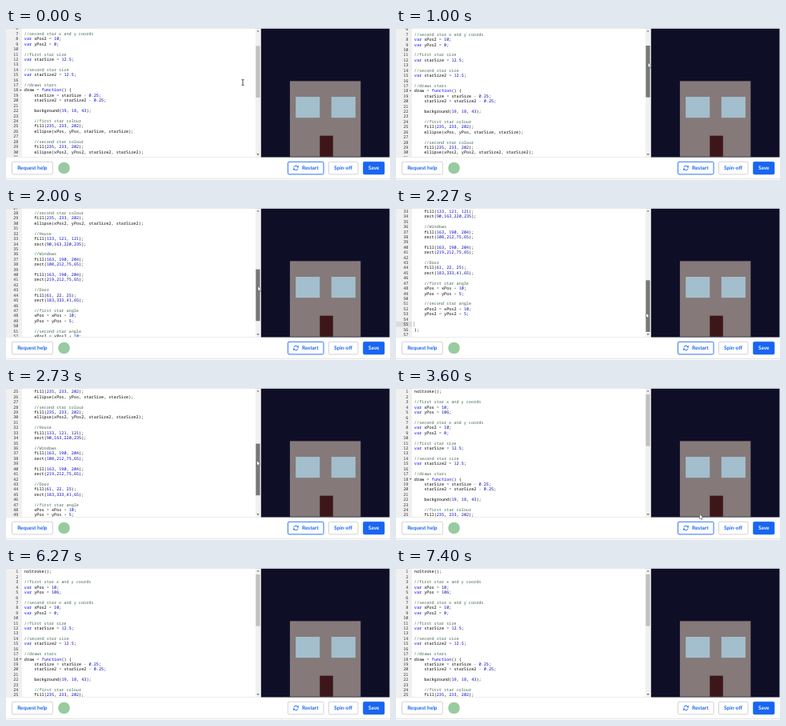
An HTML page with a canvas that plays this animation: 480x190 px, repeating every 7740 ms.

```html
<!DOCTYPE html>
<html lang="en">
<head>
<meta charset="utf-8">
<style>
html, body { margin: 0; width: 100%; height: 100%; overflow: hidden; background: #fff; }
canvas { display: block; width: 480px; height: 190px; }
</style>
</head>
<body>
<canvas id="stage"></canvas>
<script>
const LOOP = 7740;
const LINE = 6.42, CHAR = 3.105, CODE_X = 22.8, FIRST_Y = 4.6;
const SCALE = 0.402, VIEW_X = 318.7, VIEW_Y = 0.8, BOTTOM = 161;
const THUMB_START = 22.4, THUMB_TOP = 8, THUMB_END = 90.3, MAX_SCROLL = 206;
const BLUE = '#1865f2';

const code = `noStroke();

//first star x and y coords
var xPos = 10;
var yPos = 106;

//second star x and y coords
var xPos2 = 10;
var yPos2 = 0;

//first star size
var starSize = 12.5;

//second star size
var starSize2 = 12.5;

//draws stars
draw = function() {
    starSize = starSize - 0.25;
    starSize2 = starSize2 - 0.25;

    background(19, 18, 43);

    //first star colour
    fill(235, 233, 202);
    ellipse(xPos, yPos, starSize, starSize);

    //second star colour
    fill(235, 233, 202);
    ellipse(xPos2, yPos2, starSize2, starSize2);

    //House
    fill(133, 121, 121);
    rect(90,163,220,235);

    //Windows
    fill(163, 190, 204);
    rect(108,212,75,65);

    fill(163, 190, 204);
    rect(219,212,75,65);

    //Door
    fill(61, 22, 25);
    rect(183,333,41,65);

    //first star angle
    xPos = xPos + 10;
    yPos = yPos + 5;

    //second star angle
    xPos2 = xPos2 + 10;
    yPos2 = yPos2 + 5;


};
`.split('\n');

// time, x, y of the pointer
const pointerPath = [
  [0, 296, 68], [400, 296, 68], [850, 315, 43.4], [950, 315, 43.4],
  [1500, 320, 29], [1680, 320, 29], [2200, 312.5, 131], [2470, 312.5, 131],
  [3080, 315, 28], [3200, 315, 28], [3570, 379.5, 157.5], [3660, 379.5, 157.5],
  [3950, 376, 173], [4250, 376, 173], [4850, 328.5, 177.5], [5050, 328.5, 177.5]
];

const canvas = document.getElementById('stage');
const ctx = canvas.getContext('2d');
const dpr = window.devicePixelRatio || 1;
canvas.width = 480 * dpr;
canvas.height = 190 * dpr;

const clamp = (v, lo, hi) => Math.min(hi, Math.max(lo, v));

function pointerAt(t) {
  let i = 1;
  while (i < pointerPath.length - 1 && pointerPath[i][0] < t) i++;
  const [t0, x0, y0] = pointerPath[i - 1];
  const [t1, x1, y1] = pointerPath[i];
  const p = clamp((t - t0) / (t1 - t0), 0, 1);
  const e = p * p * (3 - 2 * p);
  return { x: x0 + (x1 - x0) * e, y: y0 + (y1 - y0) * e };
}

function thumbAt(t, pointer) {
  if (t < 950) return THUMB_START;
  if (t < 3150) return clamp(pointer.y - 21, THUMB_TOP, THUMB_END);
  return THUMB_TOP;
}

function box(x, y, w, h, color) {
  ctx.fillStyle = color;
  ctx.fillRect(x, y, w, h);
}

function polygon(points, fill, stroke, width) {
  ctx.beginPath();
  points.forEach(([x, y]) => ctx.lineTo(x, y));
  ctx.closePath();
  ctx.fillStyle = fill;
  ctx.fill();
  if (stroke) {
    ctx.strokeStyle = stroke;
    ctx.lineWidth = width;
    ctx.stroke();
  }
}

function tokenColor(token) {
  if (token.startsWith('//')) return '#40684c';
  if (/^(var|function)$/.test(token)) return '#0000e6';
  if (/^\d/.test(token)) return '#0000bd';
  if (/^[=+-]$/.test(token)) return '#586676';
  return '#000';
}

function drawCodeLine(line, baseline) {
  for (const match of line.matchAll(/\/\/.*|\w+(?:\.\d+)?|[=+-]|[^\w\s=+-]+/g)) {
    ctx.fillStyle = tokenColor(match[0]);
    ctx.fillText(match[0], CODE_X + match.index * CHAR, baseline);
  }
}

function drawEditor(scroll) {
  ctx.save();
  ctx.beginPath();
  ctx.rect(0, 0, 318, BOTTOM);
  ctx.clip();
  box(0, 0, 20, BOTTOM, '#f0f0f0');
  ctx.font = '5.17px "Noto Sans Mono", "DejaVu Sans Mono", monospace';
  code.forEach((line, i) => {
    const y = FIRST_Y + i * LINE - scroll;
    if (y < -5 || y > BOTTOM + 5) return;
    if (i === 54) {
      box(0, y - LINE / 2, 20, LINE, '#dcdcdc');
      box(22.2, y - LINE / 2, 0.8, LINE, '#aaa');
    }
    ctx.textAlign = 'right';
    ctx.fillStyle = '#333';
    ctx.fillText(i + 1, 15.4, y + 1.8);
    ctx.textAlign = 'left';
    if (i === 17) polygon([[16.9, y - 0.8], [19.5, y - 0.8], [18.2, y + 1]], '#555');
    drawCodeLine(line, y + 1.8);
  });
  ctx.restore();
}

function drawScrollbar(top, dragging) {
  box(311.8, 0, 6.4, BOTTOM, '#f1f1f1');
  box(312.3, top, 5.2, 64.6, dragging ? '#787878' : '#c1c1c1');
  polygon([[313.4, 4.6], [316.6, 4.6], [315, 2.8]], '#777');
  polygon([[313.4, 157.2], [316.6, 157.2], [315, 159]], '#555');
}

function drawScene(t) {
  const frame = Math.floor((t - 4230) / (1000 / 60));
  ctx.save();
  ctx.translate(VIEW_X, VIEW_Y);
  ctx.scale(SCALE, SCALE);
  ctx.beginPath();
  ctx.rect(0, 0, 400, 400);
  ctx.clip();
  box(-1, -1, 402, 402, 'rgb(15,14,39)');
  if (frame >= 0 && frame < 42) {
    const radius = (12.5 - 0.25 * (frame + 1)) / 2;
    ctx.fillStyle = 'rgb(235,233,202)';
    for (const startY of [106, 0]) {
      ctx.beginPath();
      ctx.arc(10 + 10 * frame, startY + 5 * frame, radius, 0, 2 * Math.PI);
      ctx.fill();
    }
  }
  box(90, 163, 220, 235, 'rgb(133,121,121)');
  box(108, 212, 75, 65, 'rgb(163,190,204)');
  box(219, 212, 75, 65, 'rgb(163,190,204)');
  box(183, 333, 41, 65, 'rgb(61,22,25)');
  ctx.restore();
}

function button(label, x, w, textX, style = {}) {
  ctx.beginPath();
  ctx.roundRect(x, 167.3, w, 15.6, 1.6);
  ctx.fillStyle = style.fill || '#fff';
  ctx.fill();
  ctx.strokeStyle = style.border || '#b4b6ba';
  ctx.lineWidth = style.width || 0.6;
  ctx.stroke();
  ctx.fillStyle = style.color || BLUE;
  ctx.fillText(label, textX, 177.3);
}

function drawRestartIcon() {
  const x = 362.4, y = 175;
  ctx.strokeStyle = BLUE;
  ctx.lineWidth = 0.9;
  for (const start of [Math.PI * 1.08, Math.PI * 0.08]) {
    ctx.beginPath();
    ctx.arc(x, y, 2.8, start, start + Math.PI * 0.75);
    ctx.stroke();
  }
  polygon([[x + 3.3, y - 3.3], [x + 3.3, y - 0.5], [x + 0.8, y - 0.8]], BLUE);
  polygon([[x - 3.3, y + 3.3], [x - 3.3, y + 0.5], [x - 0.8, y + 0.8]], BLUE);
}

function drawToolbar(t) {
  box(0, BOTTOM, 480, 29, '#fff');
  box(0, BOTTOM, 480, 0.5, '#d8d8d8');
  box(0, 188, 480, 0.7, '#d6d6d6');
  ctx.font = 'bold 6.44px Lato, sans-serif';
  ctx.textAlign = 'left';
  button('Request help', 7.5, 50.8, 14.2);
  const active = t < 4480;
  button('Restart', 352.4, 44.6, 370, {
    border: active && BLUE,
    width: active && 0.9,
    fill: t >= 4070 && t < 4130 && '#dbe7fd'
  });
  drawRestartIcon();
  button('Spin-off', 403.5, 36.5, 410);
  button('Save', 446.5, 26.5, 453, { fill: BLUE, border: BLUE, color: '#fff' });
  ctx.beginPath();
  ctx.arc(72.5, 175, 7.3, 0, 2 * Math.PI);
  ctx.fillStyle = '#98cba0';
  ctx.fill();
}

function drawPointer(t, { x, y }) {
  if (t >= 5050) return;
  if (x < 311) {
    box(x - 0.4, y - 3.2, 0.8, 6.4, '#222');
    box(x - 1.6, y - 3.6, 3.2, 0.7, '#222');
    box(x - 1.6, y + 2.9, 3.2, 0.7, '#222');
    return;
  }
  const shape = [[0, 0], [0, 6.4], [1.5, 5.1], [2.5, 7.3], [3.5, 6.9], [2.5, 4.7], [4.5, 4.6]];
  polygon(shape.map(([dx, dy]) => [x + dx, y + dy]), '#fff', '#444', 0.5);
}

function render(t) {
  const pointer = pointerAt(t);
  const thumb = thumbAt(t, pointer);
  const scroll = (thumb - THUMB_TOP) / (THUMB_END - THUMB_TOP) * MAX_SCROLL;
  ctx.setTransform(dpr, 0, 0, dpr, 0, 0);
  ctx.textRendering = 'geometricPrecision';
  box(0, 0, 480, 190, '#fff');
  drawEditor(scroll);
  drawScrollbar(thumb, t >= 950 && t < 3150);
  box(0, 0, 480, 0.6, '#d8d8d8');
  drawToolbar(t);
  drawScene(t);
  drawPointer(t, pointer);
}

const start = performance.now();
function tick() {
  render((performance.now() - start) % LOOP);
  requestAnimationFrame(tick);
}
tick();
</script>
</body>
</html>
```
